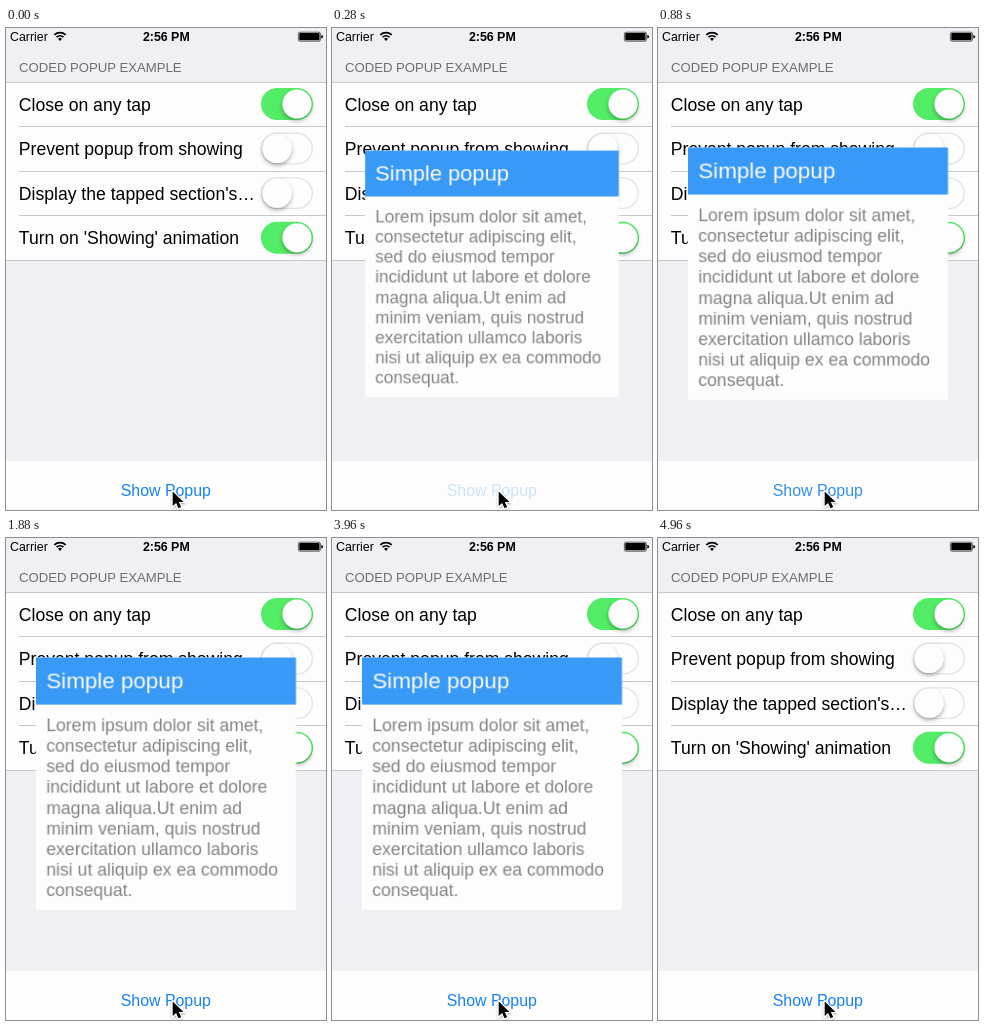
Recreate the animation shown at these times as an HTML page. Size 320x482 px, loop 5000 ms.

```html
<!DOCTYPE html>
<html lang="en">
<head>
<meta charset="utf-8">
<title>Popup example</title>
<style>
  html, body { margin: 0; width: 100%; height: 100%; overflow: hidden; background: #efeff4; }
  svg { display: block; width: 320px; height: 482px; font-family: "Liberation Sans", Arial, sans-serif; }
  .label { font-size: 17.6px; }
  .status { font-size: 12.4px; }
  .line { stroke: #c8c7cc; }
  #popup { transform-origin: 160px 245.7px; }
</style>
</head>
<body>
<svg viewBox="0 0 320 482">
  <defs>
    <filter id="shadow" x="-30%" y="-30%" width="160%" height="170%">
      <feDropShadow dx="0" dy="2.3" stdDeviation="1.9" flood-opacity=".33"/>
    </filter>
    <filter id="cursor-shadow" x="-50%" y="-50%" width="200%" height="200%">
      <feDropShadow dx="0" dy="1" stdDeviation="1" flood-opacity=".35"/>
    </filter>
  </defs>
  <rect width="320" height="482" fill="#efeff4"/>

  <text class="status" x="4" y="12.7">Carrier</text>
  <g fill="none" stroke="#000" stroke-width="1.7">
    <path d="M48.3 6.8a8.4 8.4 0 0 1 11.4 0M50.5 9.2a5.1 5.1 0 0 1 7 0"/>
    <path d="M54 13l-2-2.2a2.8 2.8 0 0 1 4 0z" fill="#000" stroke="none"/>
  </g>
  <text class="status" x="160.3" y="12.7" text-anchor="middle" font-weight="bold">2:56 PM</text>
  <rect x="292.4" y="4.2" width="22" height="9" rx="1.5" fill="none" stroke="#000" stroke-width=".6"/>
  <rect x="293.3" y="5.1" width="20.2" height="7.2" rx=".8"/>
  <path d="M315.3 7q1.8 0 1.8 1.7t-1.8 1.7z"/>

  <text x="13" y="44" font-size="13.15" fill="#6d6d72">CODED POPUP EXAMPLE</text>
  <rect y="54" width="320" height="179" fill="#fdfdfd"/>
  <path class="line" d="M0 54.5H320M0 232.5H320"/>
  <g id="rows"></g>

  <rect y="433" width="320" height="49" fill="#fdfdfd"/>
  <text id="button" x="159.8" y="467.7" text-anchor="middle" font-size="15.9" fill="#1582f0">Show Popup</text>

  <g id="popup">
    <rect x="30" y="119.5" width="260" height="252.5" fill="#fdfdfd"/>
    <rect x="30" y="119.5" width="260" height="47" fill="#389af6"/>
    <text x="40.3" y="150.3" font-size="22.4" fill="#fdfdfd">Simple popup</text>
    <g id="message" class="label" fill="#848484"></g>
  </g>

  <g id="cursor">
    <path d="M166.7 463.5v14.6l3.4-3.2 2.4 5.4 2.7-1.2-2.4-5.2h4.7z" filter="url(#cursor-shadow)"
      stroke="#fff" stroke-width="2.2" paint-order="stroke"/>
  </g>
</svg>
<script>
  const LOOP = 5000;
  const byId = id => document.getElementById(id);

  const rows = [
    ["Close on any tap", true],
    ["Prevent popup from showing", false],
    ["Display the tapped section's…", false],
    ["Turn on 'Showing' animation", true]
  ];

  const toggle = (y, on) => `
    <rect x="255.7" y="${y - 15.3}" width="50.6" height="30.6" rx="15.3"
      fill="${on ? "#52ec66" : "#fdfdfd"}" stroke="${on ? "#52ec66" : "#e4e4e4"}" stroke-width="1.4"/>
    <circle cx="${on ? 291 : 271}" cy="${y}" r="14.5" fill="#fdfdfd" filter="url(#shadow)"/>`;

  byId("rows").innerHTML = rows.map(([text, on], i) => {
    const y = 76 + i * 44.6;
    const divider = i ? `<path class="line" d="M13 ${Math.floor(54 + i * 44.6) + .5}H320"/>` : "";
    return `${divider}<text class="label" x="12.8" y="${y + 6.5}">${text}</text>${toggle(y, on)}`;
  }).join("");

  const lines = [
    "Lorem ipsum dolor sit amet,",
    "consectetur adipiscing elit,",
    "sed do eiusmod tempor",
    "incididunt ut labore et dolore",
    "magna aliqua.Ut enim ad",
    "minim veniam, quis nostrud",
    "exercitation ullamco laboris",
    "nisi ut aliquip ex ea commodo",
    "consequat."
  ];
  byId("message").innerHTML = lines.map((line, i) =>
    `<text x="40.3" y="${193.5 + i * 20.53}">${line}</text>`).join("");

  // Each step is [time in ms, value, easing towards the next step].
  function play(id, property, steps, format = String) {
    const frames = steps.map(([time, value, easing = "linear"]) =>
      ({ offset: time / LOOP, [property]: format(value), easing }));
    byId(id).animate(frames, { duration: LOOP, iterations: Infinity });
  }

  const hold = "step-end";
  play("popup", "transform", [
    [0, 0, hold], [80, 0, "ease-out"], [235, 1.025], [280, .977, "ease-out"],
    [370, .9, "ease-in-out"], [590, 1, hold], [LOOP, 1]
  ], s => `scale(${s})`);
  play("popup", "opacity", [
    [0, 1, hold], [4650, 1, "ease-in-out"], [4950, 0, hold], [LOOP, 0]
  ]);
  play("button", "opacity", [
    [0, 1, hold], [40, .2, hold], [280, .2], [480, .45], [880, .88],
    [1360, 1, hold], [LOOP, 1]
  ]);
  play("cursor", "transform", [
    [0, [0, 0], hold], [2120, [1, 1], hold], [3960, [0, 0], hold], [LOOP, [0, 0]]
  ], ([x, y]) => `translate(${x}px, ${y}px)`);
</script>
</body>
</html>
```
